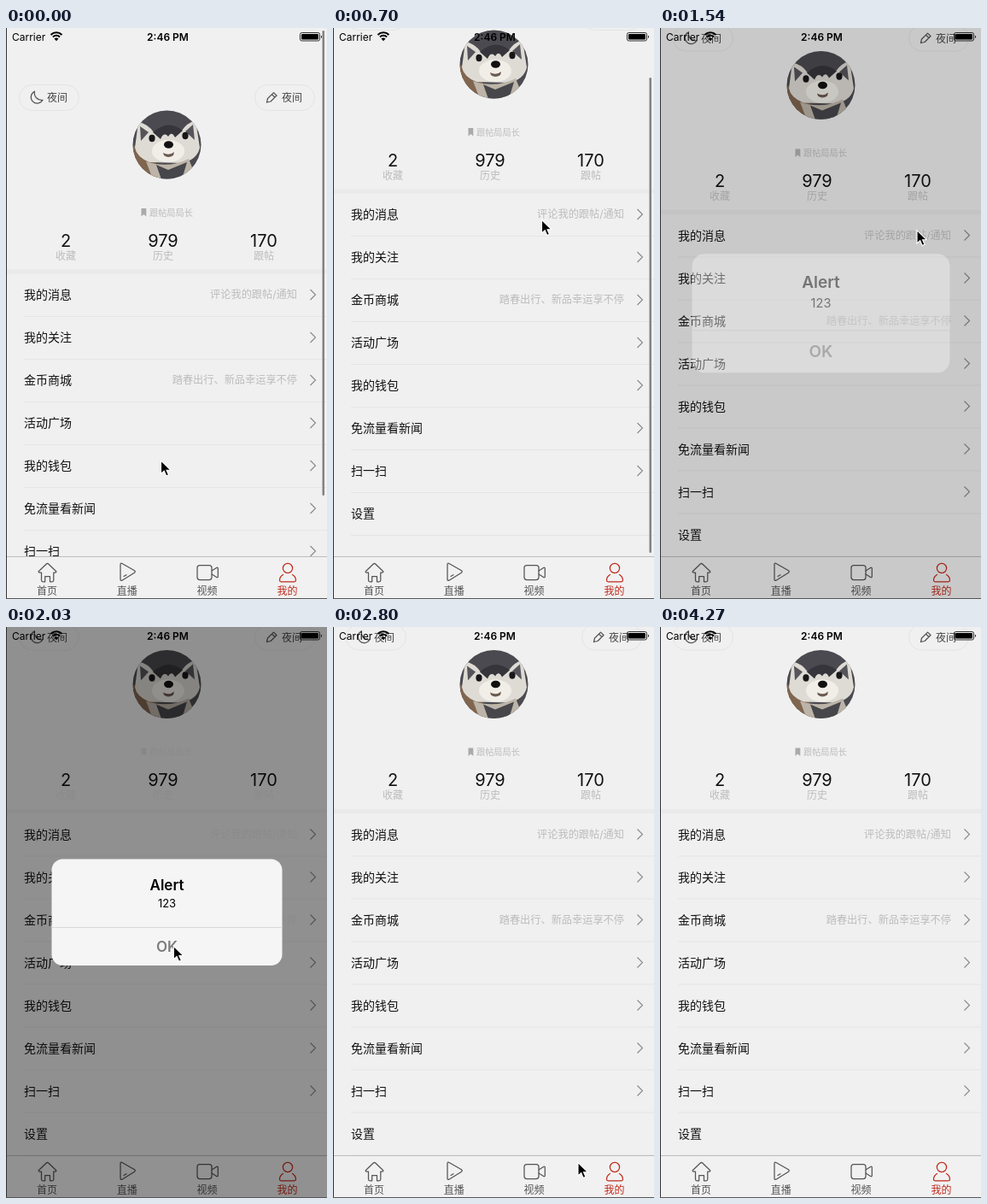
These frames come from a looping animation (376x668 px, 4620 ms). An HTML page:

```html
<!DOCTYPE html>
<html lang="zh-CN">
<head>
<meta charset="utf-8">
<title>我的</title>
<style>
html, body { margin: 0; width: 100%; height: 100%; overflow: hidden; background: #f0f0f0; }
svg { display: block; width: 100%; height: 100%; }
text { font-family: Inter, "Noto Sans CJK SC", "Noto Sans CJK", sans-serif; }
.line { fill: none; stroke: #555; stroke-width: 1.25; stroke-linecap: round; stroke-linejoin: round; }
.red { stroke: #c02a1c; }
</style>
</head>
<body>
<svg id="stage" viewBox="0 0 376 668" preserveAspectRatio="none"></svg>
<script>
const LOOP = 4620, STEP = 70, MAX_SCROLL = 69.5;

const text = (x, y, size, str, fill = "#111", anchor = "start", weight = 400) =>
  `<text x="${x}" y="${y}" font-size="${size}" fill="${fill}" text-anchor="${anchor}" font-weight="${weight}">${str}</text>`;
const box = (x, y, w, h, fill, rx = 0) =>
  `<rect x="${x}" y="${y}" width="${w}" height="${h}" rx="${rx}" fill="${fill}"/>`;
const line = (d, cls = "") => `<path class="line ${cls}" d="${d}"/>`;
const shape = (d, fill) => `<path d="${d}" fill="${fill}"/>`;
const dot = (x, y, rx, ry, fill) => `<ellipse cx="${x}" cy="${y}" rx="${rx}" ry="${ry}" fill="${fill}"/>`;

const rows = [
  ["我的消息", "评论我的跟帖/通知"], ["我的关注"], ["金币商城", "踏春出行、新品幸运享不停"],
  ["活动广场"], ["我的钱包"], ["免流量看新闻"], ["扫一扫"], ["设置"]
];
const stats = [[70, "2", "收藏"], [184, "979", "历史"], [302, "170", "跟帖"]];

const pill = x =>
  `<rect x="${x}" y="66.5" width="70" height="30" rx="15" fill="none" stroke="#e4e4e4"/>`;

const avatar = `<g clip-path="url(#round)">
  ${box(148, 96, 81, 81, "#4b4a50")}
  ${shape("M148 138L172 134L178 177H148Z", "#80654f")}
  ${shape("M151 140L155 110Q166 112 173 122Q190 114 206 120Q212 111 222 108L227 140Q224 154 206 158L168 157Q153 151 151 140Z", "#dedbd5")}
  ${shape("M172 122Q190 106 207 120L198 128Q194 120 190 127Q185 121 181 130Z", "#35353b")}
  ${shape("M157 115L167 122L158 132Z", "#55545a")}
  ${shape("M219 113L210 121L221 131Z", "#55545a")}
  ${dot(190, 144, 19, 13, "#f1eee8")}
  ${dot(171, 129, 3.6, 4.2, "#17171a")}
  ${dot(210, 126, 3.6, 4.2, "#17171a")}
  ${dot(190.5, 136.5, 5.5, 4.2, "#111")}
  ${shape("M184 146Q191 150 197 145L196 149Q190 153 185 149Z", "#6b5a50")}
  ${shape("M164 156Q190 165 214 153L220 168L200 177H172Z", "#bcb4a8")}
  ${shape("M176 160L190 166L212 157L206 177H182Z", "#46464b")}
</g>`;

const header = () =>
  pill(15.5) + pill(291.5) +
  line("M33.5 74.2A7.3 7.3 0 1 0 43 84.3A8.4 8.4 0 0 1 33.5 74.2Z") +
  line("M305.5 87L306.5 82.5L313.5 75.6L317 79L310 86ZM311.5 77.8L314.8 81") +
  text(48, 86, 12, "夜间", "#444") + text(323, 86, 12, "夜间", "#444") + avatar +
  `<g class="soft">${shape("M158.500 211H164.300V220.500L161.400 218L158.500 220.500Z", "#aaa")}` +
  text(168, 219.700, 10.2, "跟帖局局长", "#bcbcbc") + "</g>" +
  stats.map(([x, n, label]) =>
    text(x, 255.5, 20, n, "#111", "middle") +
    `<g class="soft">${text(x, 270.5, 12, label, "#bcbcbc", "middle")}</g>`).join("") +
  box(1, 282.5, 375, 5, "#eaeaea");

const row = ([title, note], i) => {
  const y = 312 + 50 * i;
  return text(21, y + 5.2, 14, title) +
    (note ? `<g class="soft">${text(341, y + 4.4, 12.2, note, "#bcbcbc", "end")}</g>` : "") +
    (i < 7 ? `<path d="M356.500 ${y - 6}L362.500 ${y}L356.500 ${y + 6}" fill="none" stroke="#888" stroke-width="1.1"/>` : "") +
    box(21, y + 25, 355, 1, "#e5e5e5");
};

const arc = (r, w) => {
  const k = r * 0.72;
  return `<path d="M${59 - k} ${14.5 - k}A${r} ${r} 0 0 1 ${59 + k} ${14.5 - k}" fill="none" stroke="#000" stroke-width="${w}"/>`;
};

const statusBar = text(7, 14.5, 12, "Carrier", "#000") +
  arc(9, 2) + arc(5.6, 2) + shape("M59 15.200L56.500 12.500Q59 10.300 61.500 12.500Z", "#000") +
  text(189.500, 14.5, 12, "2:46 PM", "#000", "middle", 600) +
  `<rect x="344.500" y="5.500" width="23" height="9.500" rx="2" fill="none" stroke="#000" stroke-width=".8"/>` +
  box(346, 7, 20, 6.5, "#000", 1) + shape("M369 8.500Q371 10.250 369 12Z", "#000");

const tabBar = box(1, 618, 375, 50, "#f1f1f1") + box(1, 618, 375, 1, "#bdbdbd") +
  line("M41.500 637H39Q37.500 636.500 38.700 635.300L47.300 627Q48.500 626 49.700 627L58.300 635.300Q59.500 636.500 58 637H55.800V646Q55.800 647.800 54 647.800H51.500V641.500H45.700V647.800H43.300Q41.500 647.800 41.500 646Z") +
  line("M134 627.500Q134 625.500 136 626.500L150.500 634.800Q152 636 150.500 637.200L136 646.200Q134 647 134 645ZM138 641.500L141 639.700") +
  `<rect class="line" x="224" y="628.500" width="17" height="17" rx="3"/>` +
  line("M241 635L247 631.300Q248.300 631 248.300 632.300V641.700Q248.300 643 247 642.700L241 639") +
  `<circle class="line red" cx="330" cy="632" r="5.600"/>` +
  line("M324.500 639.500Q320.500 642 320.500 646Q320.500 647.800 322.300 647.800H337.700Q339.500 647.800 339.500 646Q339.500 642 335.500 639.500", "red") +
  ["首页", "直播", "视频", "我的"].map((s, i) =>
    text(48 + 93.8 * i, 663, 12, s, i == 3 ? "#c02a1c" : "#555", "middle")).join("");

const alertBox = box(53.5, 271.5, 270, 124.5, "#f5f5f5", 13) +
  text(188.5, 307.5, 17, "Alert", "#000", "middle", 600) +
  text(188.5, 327.5, 13, "123", "#000", "middle") +
  box(53.5, 351, 270, 1, "#d9d9d9") +
  text(188.5, 380, 17, "OK", "#7d7d7d", "middle", 600);

const stage = document.getElementById("stage");
stage.innerHTML = `<defs><clipPath id="round"><circle cx="188.500" cy="136.500" r="40"/></clipPath></defs>
  ${box(0, 0, 376, 668, "#f0f0f0")}
  <g id="page">${header()}${rows.map(row).join("")}</g>
  <rect id="bar" x="370.500" width="2.500" rx="1.250" fill="#838383"/>
  ${statusBar}${tabBar}
  <rect id="dim" width="376" height="668"/>
  <g id="alert">${alertBox}</g>
  ${box(0, 0, 1, 668, "#333")}${box(0, 667, 376, 1, "#555")}
  <path id="cursor" d="M0 0V15.500L3.700 12.200L6.200 18L9 16.800L6.500 11.200H11.300Z" fill="#000" stroke="#fff" stroke-width="1.100"/>`;

const [page, bar, dim, alertEl, cursor] =
  ["page", "bar", "dim", "alert", "cursor"].map(id => document.getElementById(id));
const soft = stage.querySelectorAll(".soft");

// Keys are [time, ...values], linear in between.
const scrollKeys = [[0, 0], [70, 8], [140, 30], [280, 82], [420, 112], [490, 121], [560, 116],
  [630, 105], [700, 94], [770, 85], [840, 78.5], [980, 72], [1120, MAX_SCROLL]];
const cursorKeys = [[0, 181.5, 506], [70, 182, 498], [420, 192, 368], [700, 244.5, 224.5],
  [1050, 298, 238], [1260, 301, 236.5], [1610, 301, 236.5], [1960, 196.5, 373],
  [2380, 195.5, 374.5], [2520, 202, 394], [2800, 287, 626.500], [3150, 346, 672],
  [3850, 350, 672], [3920, 350, 658], [4060, 338, 633], [4200, 353, 655], [4270, 355, 680]];

const clamp = v => Math.min(1, Math.max(0, v));
const easeOut = v => 1 - (1 - clamp(v)) ** 2;

function track(keys, t) {
  const i = keys.findIndex(k => k[0] > t);
  if (i < 0) return keys[keys.length - 1].slice(1);
  const a = keys[i - 1], b = keys[i], p = (t - a[0]) / (b[0] - a[0]);
  return a.slice(1).map((v, j) => v + (b[j + 1] - v) * p);
}

function draw(t) {
  const [scroll] = track(scrollKeys, t);
  page.setAttribute("transform", `translate(0 ${-scroll})`);
  bar.setAttribute("y", 3 + scroll * 0.585);
  bar.setAttribute("height", Math.min(544 + scroll * 0.128, 611 - scroll * 0.585));
  bar.setAttribute("opacity", 1 - clamp((t - 1000) / 280));

  const shown = easeOut((t - 1447) / 400), gone = easeOut((t - 2302) / 400);
  const alpha = shown * (1 - gone), shade = 0.4 * alpha, scale = 1.2 - 0.2 * shown;
  dim.setAttribute("opacity", shade);
  alertEl.setAttribute("opacity", alpha);
  alertEl.setAttribute("transform",
    `translate(188.5 333.750) scale(${scale}) translate(-188.5 -333.750)`);
  soft.forEach(el => el.setAttribute("opacity", 1 - 5 * shade * shade));

  const [x, y] = track(cursorKeys, t);
  cursor.setAttribute("transform", `translate(${x} ${y})`);
}

const start = performance.now();
function tick() {
  const t = (performance.now() - start) % LOOP;
  draw(Math.floor(t / STEP) * STEP);
  requestAnimationFrame(tick);
}
tick();
</script>
</body>
</html>
```
